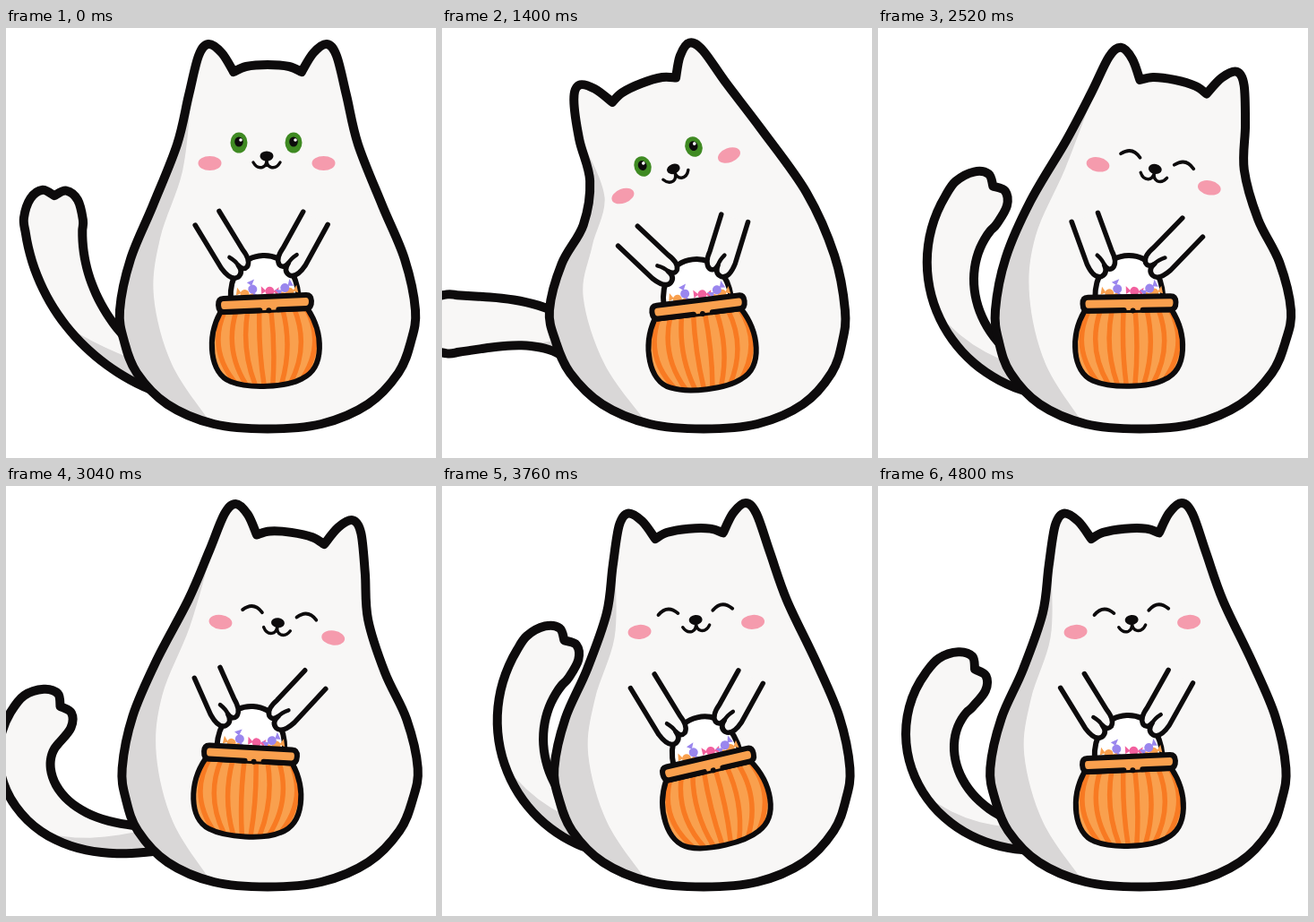
Write an HTML page with a canvas that moves like this. It is 480x480 px and loops after 4.84 s.

```html
<!DOCTYPE html>
<html lang="en">
<head>
<meta charset="utf-8">
<title>Swaying cat</title>
<style>
html, body { margin: 0; width: 100%; height: 100%; overflow: hidden; background: #fff; }
canvas { display: block; width: 480px; height: 480px; }
</style>
</head>
<body>
<canvas id="stage" width="480" height="480"></canvas>
<script>
const LOOP = 4840, OUTLINE = 10, MIDDLE = 292;
const INK = '#0d0b0c', FUR = '#f8f7f6', SHADE = '#d9d7d7', GREEN = '#3f8a22';
const LIGHT = '#f9a04e', ORANGE = '#f87a22', PURPLE = '#9a86ee', PINK = '#f2609e';
const PIVOT = [285, 233], REST = [289, 307];
const ctx = document.getElementById('stage').getContext('2d');

// Right half of the upright body, measured from the middle line, top to bottom
const half = [[0, 41], [24, 43], [38, 49], [51, 28], [66, 18], [77, 31], [88, 75], [101, 130],
  [128, 198], [153, 258], [165, 315], [160, 350], [146, 385], [112, 420], [60, 442], [0, 447.5]];
const outline = [...half, ...half.slice(1, -1).reverse().map(([x, y]) => [-x, y])]
  .map(([x, y]) => [MIDDLE + x, y]);
const shadeEdge = [[206, 85], [197, 160], [172, 235], [165, 300], [185, 375], [228, 440]];

// time, tilt in degrees, drop
const headKeys = [[0, 0, 0], [640, 20, 0], [1400, -21, 0], [2000, -15, 10],
  [2550, 12, 8], [3040, 8, 6.5], [3500, -5, 6]];
// time, x, y, degrees
const basketKeys = [[0, ...REST, -2.5], [640, 292, 315, 1], [1400, 286, 311, -7],
  [2000, 288, 315, -5], [3040, 273, 299, 3], [3760, 297, 310, -13], [4800, 280, 309, -2.5]];
// time, heading at base, middle and tip (0 is left, 90 is up), length
const tailOut = [-2, 42, 145, 246], tailIn = [25, 78, 135, 246];
const tailKeys = [[0, 28, 58, 92, 228], [640, 20, 100, 30, 251], [1400, 75, 10, 0, 196],
  [2000, 2, 50, 150, 251], [2400, ...tailIn], [3040, ...tailOut], [3760, ...tailIn],
  [4400, ...tailOut], [4800, 9, 65, 145, 246]];

const clamp = v => Math.max(0, Math.min(1, v));
const radians = degrees => degrees * Math.PI / 180;

function turn([x, y], degrees) {
  const c = Math.cos(radians(degrees)), s = Math.sin(radians(degrees));
  return [x * c - y * s, x * s + y * c];
}

function sample(keys, time) {
  let i = 0;
  while (i < keys.length - 2 && time >= keys[i + 1][0]) i++;
  const [a, b] = [keys[i], keys[i + 1]];
  const k = (1 - Math.cos(Math.PI * clamp((time - a[0]) / (b[0] - a[0])))) / 2;
  return a.slice(1).map((v, j) => v + (b[j + 1] - v) * k);
}

// The head turns rigidly, the belly leans a little, the bottom stays put
function bend([x, y], tilt, lift) {
  const u = clamp((300 - y) / 240), w = u * u * (3 - 2 * u);
  const [rx, ry] = turn([x - PIVOT[0], y - PIVOT[1]], tilt);
  const lean = 0.35 * tilt * (1 - w) * clamp((440 - y) / 130);
  return [x + (PIVOT[0] + rx - x) * w + lean, y + (PIVOT[1] + ry + lift - y) * w];
}

function spline(path, pts) {
  path.lineTo(...pts[0]);
  for (let i = 0; i < pts.length - 1; i++) {
    const a = pts[i], b = pts[i + 1], before = pts[i - 1] || a, after = pts[i + 2] || b;
    path.bezierCurveTo(a[0] + (b[0] - before[0]) / 6, a[1] + (b[1] - before[1]) / 6,
      b[0] - (after[0] - a[0]) / 6, b[1] - (after[1] - a[1]) / 6, ...b);
  }
}

function paint(shape, fill, width, color = INK) {
  const path = typeof shape === 'string' ? new Path2D(shape) : shape;
  if (fill) { ctx.fillStyle = fill; ctx.fill(path); }
  if (width) { ctx.lineWidth = width; ctx.strokeStyle = color; ctx.stroke(path); }
}

function oval(x, y, rx, ry, fill) {
  const path = new Path2D();
  path.ellipse(x, y, rx, ry, 0, 0, 7);
  paint(path, fill);
}

function group(x, y, degrees, draw) {
  ctx.save();
  ctx.translate(x, y);
  ctx.rotate(radians(degrees));
  draw();
  ctx.restore();
}

function shaded(path, shadow) {
  paint(path, FUR);
  ctx.save();
  ctx.clip(path);
  paint(shadow, SHADE);
  ctx.restore();
  paint(path, null, OUTLINE);
}

function drawTail([base, middle, tip, length]) {
  const steps = 16, spine = [];
  let x = 172, y = 394;
  for (let i = 0; i <= steps; i++) {
    const t = i / steps;
    const heading = radians(base * (1 - t) * (1 - 2 * t) + 4 * middle * t * (1 - t) + tip * t * (2 * t - 1));
    const c = Math.cos(heading), s = Math.sin(heading), w = 13 + 20 * t;
    const px = x, py = y;
    spine.push((side, ahead = 0) => [px - s * w * side - c * ahead, py + c * w * side - s * ahead]);
    x -= c * length / steps;
    y -= s * length / steps;
  }
  const end = spine[steps], notch = end(0, 26);
  const path = new Path2D(), shadow = new Path2D();
  spline(path, [...spine.map(at => at(1)), end(0.8, 22), end(0.4, 32), notch]);
  spline(path, [notch, end(-0.4, 32), end(-0.8, 22), ...spine.map(at => at(-1)).reverse()]);
  path.closePath();
  const lower = spine.slice(0, steps / 2 + 1);
  lower.forEach(at => shadow.lineTo(...at(1.2)));
  lower.map((at, i) => at(4 * i / steps - 1)).reverse().forEach(p => shadow.lineTo(...p));
  shaded(path, shadow);
}

function drawBody(tilt, lift) {
  const pts = outline.map(p => bend(p, tilt, lift)), edge = shadeEdge.map(p => bend(p, tilt, lift));
  const body = new Path2D(), shadow = new Path2D();
  spline(body, [...pts.slice(-2), ...pts.slice(0, 3)]);
  spline(body, pts.slice(2, -1));
  body.closePath();
  spline(shadow, edge);
  shadow.lineTo(60, 460);
  shadow.lineTo(60, edge[0][1]);
  shaded(body, shadow);
}

function drawEye(x, open) {
  if (!open) return paint(`M${x - 10} 134Q${x + 1} 123 ${x + 12} 134`, null, 3.8);
  group(x, 128 + 6 * (1 - open), 0, () => {
    ctx.scale(1, open);
    oval(0, 0, 9.5, 11.5, GREEN);
    oval(0, -1, 4.8, 5.5, INK);
    oval(2, -3, 1.8, 1.8, '#fff');
  });
}

function drawFace(tilt, lift, time) {
  group(PIVOT[0], PIVOT[1] + lift, tilt, () => {
    ctx.translate(-PIVOT[0], -PIVOT[1]);
    for (const x of [227.5, 354.5]) oval(x, 151, 13, 8, '#f59bad');
    drawEye(260, clamp((1980 - time) / 80));
    drawEye(321, clamp((2040 - time) / 80));
    oval(291, 143, 7.5, 5.5, INK);
    paint('M276 150Q280 157 286 155.5Q291 154 291 147Q291 154 296 155.5Q302 157 306 150', null, 3.4);
  });
}

function candy(x, y, color, degrees) {
  group(x, y, degrees, () => {
    oval(0, 0, 5, 5, color);
    paint('M-4 0L-10 -5L-9 4ZM4 0L10 -5L9 4Z', color);
  });
}

function drawBasket(x, y, degrees) {
  group(x, y, degrees, () => {
    paint('M-38 -6C-38 -30 -25 -53 0 -53S37 -30 38 -6', '#fff', 6);
    candy(-22, -11, LIGHT, 17);
    candy(-13, -16, PURPLE, 75);
    candy(6, -13, PINK, 6);
    candy(28, -11, LIGHT, -17);
    candy(23, -16, PURPLE, -34);
    const pot = new Path2D('M-50 8C-67 36 -65 76 -42 86C-22 95 20 95 38 86C64 75 64 36 47 8Z');
    paint(pot, LIGHT);
    ctx.save();
    ctx.clip(pot);
    for (let i = -3.5; i < 4; i++) {
      paint(`M${i * 13} 8Q${i * 19} 50 ${i * 10} 90`, null, 5.5, ORANGE);
    }
    ctx.restore();
    paint(pot, null, 6);
    paint('M-46 -7H46Q52 -7 52 0Q52 8 46 8H-46Q-52 8 -52 0Q-52 -7 -46 -7Z', LIGHT);
    paint('M-6 8H-46Q-52 8 -52 0Q-52 -7 -46 -7H46Q52 -7 52 0Q52 8 46 8H15', null, 6);
    oval(4, 8.5, 3, 3, INK);
  });
}

// The shoulders follow the body, the paws hold the handle
function drawArm(side, tilt, [bx, by, degrees]) {
  const [ox, oy] = turn([60 * side, 0], tilt * 0.45);
  const sx = 285 + ox + 0.8 * tilt + 0.4 * (bx - REST[0]);
  const sy = 212 + oy + 0.4 * Math.abs(tilt) + 0.4 * (by - REST[1]);
  const [gx, gy] = turn([29 * side, -39], degrees);
  const dx = bx + gx - sx, dy = by + gy - sy, reach = Math.hypot(dx, dy);
  group(sx, sy, Math.atan2(dy, dx) * 180 / Math.PI - 90, () => {
    ctx.scale(-side, 1);
    const d = n => reach + n;
    paint(`M-16 0L-15 ${d(-10)}Q-13 ${d(8)} -4 ${d(8)}Q4 ${d(7)} 3 ${d(-3)}` +
      `Q5 ${d(5)} 11 ${d(3)}Q18 ${d(-1)} 16 ${d(-16)}L15 0`, FUR, 5.5);
    paint(`M3 ${d(-3)}Q3 ${d(-9)} -1 ${d(-16)}`, null, 4.5);
  });
}

function frame() {
  const time = performance.now() % LOOP;
  const [tilt, drop] = sample(headKeys, time), lift = tilt * tilt / 42 + drop;
  const basket = sample(basketKeys, time);
  ctx.fillStyle = '#fff';
  ctx.fillRect(0, 0, 480, 480);
  ctx.lineCap = ctx.lineJoin = 'round';
  drawTail(sample(tailKeys, time));
  drawBody(tilt, lift);
  drawFace(tilt, lift, time);
  drawBasket(...basket);
  for (const side of [-1, 1]) drawArm(side, tilt, basket);
  requestAnimationFrame(frame);
}
frame();
</script>
</body>
</html>
```
